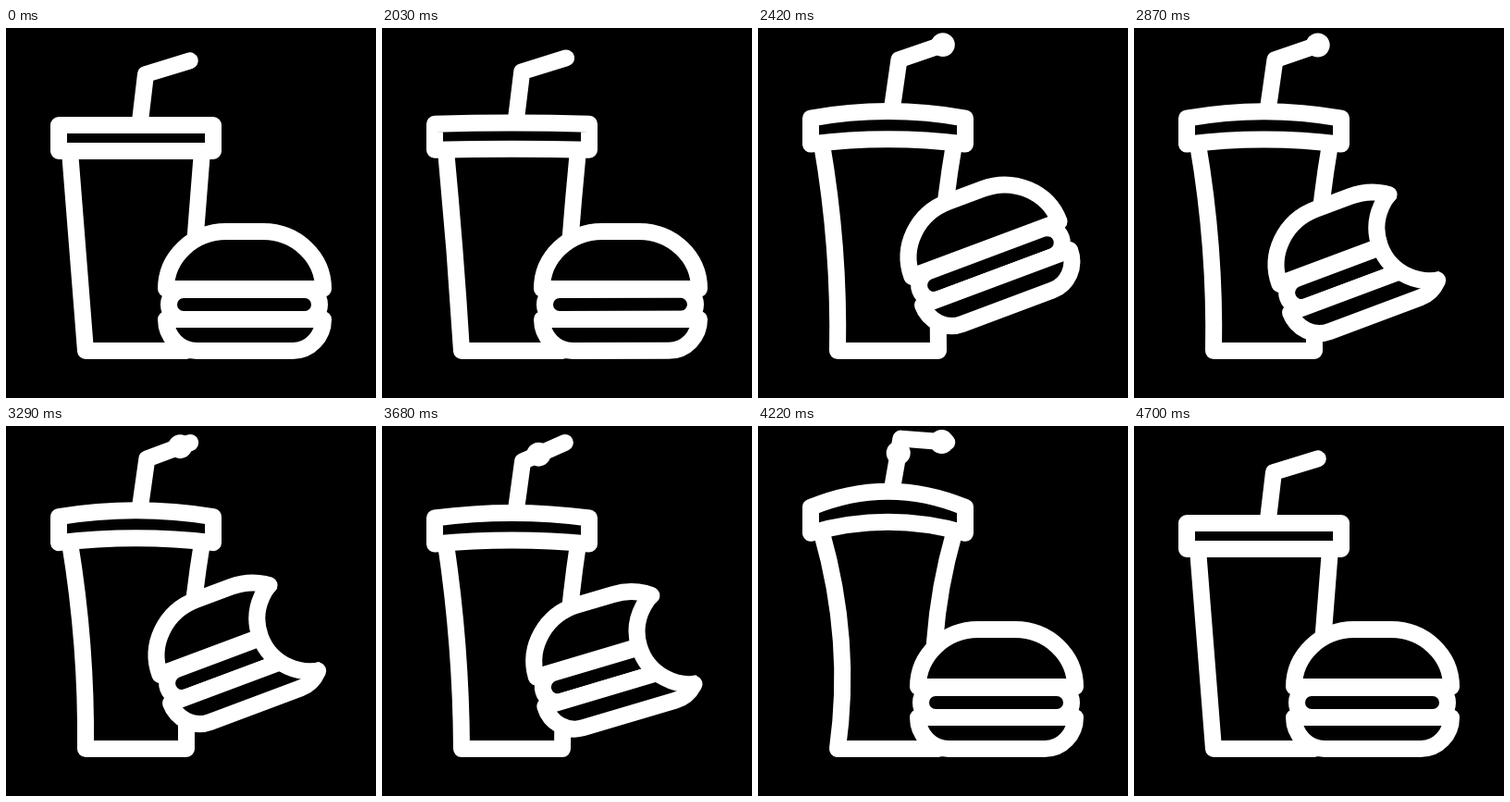
Animation of 400 by 400 pixels, one loop 4730 ms. Source, as an HTML page:

```html
<!DOCTYPE html>
<html lang="en">
<head>
<meta charset="utf-8">
<title>Drink and burger</title>
<style>
  html, body { margin: 0; height: 100%; overflow: hidden; background: #000; }
  svg { display: block; width: 100vw; height: 100vh; }
</style>
</head>
<body>
<svg viewBox="0 0 400 400" fill="#000" stroke="#fff" stroke-width="18" stroke-linecap="round" stroke-linejoin="round">
  <clipPath id="inside">
    <path id="outline" d="M173 282A65 62 0 0 1 238 220H278A65 62 0 0 1 343 282L339 299L343 315A33 34 0 0 1 310 349H206A33 34 0 0 1 173 315L177 299Z"/>
  </clipPath>
  <path id="straw" fill="none"/>
  <g id="bulbs" fill="#fff" stroke="none"></g>
  <path id="cup"/>
  <path id="lid"/>
  <g id="burger">
    <rect x="176" y="283" width="163" height="32" rx="16"/>
    <path d="M173 282A65 62 0 0 1 238 220H278A65 62 0 0 1 343 282Z"/>
    <path d="M173 315H343A33 34 0 0 1 310 349H206A33 34 0 0 1 173 315Z"/>
    <circle id="hole" cy="282" r="62" stroke="none"/>
    <g clip-path="url(#inside)"><circle id="edge" cy="282" r="57" fill="none"/></g>
    <path id="caps"/>
  </g>
</svg>
<script>
const LOOP = 4730, GULP = 455, FIRST_GULP = 2420, BITE_R = 57;
const $ = id => document.getElementById(id);
const set = (id, name, value) => $(id).setAttribute(name, value);

const progress = (t, from, to) => Math.max(0, Math.min(1, (t - from) / (to - from)));
const smooth = (t, from, to) => {
  const u = progress(t, from, to);
  return u * u * (3 - 2 * u);
};

// The last gulp follows the one before it at a shorter distance
const bulbs = Array.from({ length: 6 }, (_, i) => ({
  arrival: FIRST_GULP + GULP * Math.min(i, 4.44),
  dot: $("bulbs").appendChild(document.createElementNS("http://www.w3.org/2000/svg", "circle")),
}));

const outline = $("outline"), outlineLength = outline.getTotalLength();
const rim = Array.from({ length: 401 }, (_, i) => outline.getPointAtLength(outlineLength * i / 400));

function drawDrink(t) {
  const pull = (1 - (1 - progress(t, 2000, 2350)) ** 2) * (1 - smooth(t, 4210, 4650));
  const wobble = Math.cos(2 * Math.PI * ((t - FIRST_GULP) / GULP - 0.1));
  const lastGulp = smooth(t, 3860, 4200);
  const r = pull * (12.5 + 3 * wobble + 20 * lastGulp), e = r / 2;
  const angle = (-17 + pull * (4 * wobble - 5 + 24 * lastGulp)) * Math.PI / 180;

  const bendX = 151 + r * 0.1, bendY = 50 - r * 1.06;
  const tipX = bendX + 50 * Math.cos(angle), tipY = bendY + 50 * Math.sin(angle);
  set("straw", "d", `M144.5 ${105 - r}L${bendX} ${bendY}L${tipX} ${tipY}`);
  set("cup", "d", `M69 ${133 - e}Q${77.5 + r * 0.72} ${241 - e / 2} 86 349H195` +
    `Q${203.5 - r * 0.72} ${241 - e / 2} 212 ${133 - e}`);
  set("lid", "d", `M57 ${105 - e}Q140.5 ${105 - 1.5 * r} 224 ${105 - e}V${133 - e}` +
    `Q140.5 ${133 - 1.2 * r} 57 ${133 - e}Z`);

  const straw = $("straw"), length = straw.getTotalLength();
  for (const { arrival, dot } of bulbs) {
    const s = length + (t - arrival) * 0.3;
    const size = Math.min(13, 8 + s / 4, 13 - (s - length) * 0.15);
    const p = straw.getPointAtLength(Math.max(0, Math.min(s, length)));
    dot.setAttribute("cx", p.x);
    dot.setAttribute("cy", p.y);
    dot.setAttribute("r", size < 8 ? 0 : size);
  }
}

function drawBurger(t) {
  const lift = smooth(t, 2020, 2420) * (1 - smooth(t, 3480, 4200));
  const recoil = smooth(t, 2600, 2870) * (1 - smooth(t, 2870, 3200));
  const bite = smooth(t, 2580, 2700) * (1 - smooth(t, 3720, 3880));
  set("burger", "transform", `translate(${-12 * lift - 9 * recoil} ${-43 * lift + 8 * recoil}) rotate(${-20.5 * lift} 258 282)`);

  const x = 346 + 70 * (1 - bite);
  set("hole", "cx", x);
  set("edge", "cx", x);
  // Round off the tips where the bite crosses the outline
  const bitten = p => Math.hypot(p.x - x, p.y - 282) < BITE_R;
  set("caps", "d", rim.filter((p, i) => i && bitten(p) !== bitten(rim[i - 1]))
    .map(p => `M${p.x} ${p.y}h.01`).join(""));
}

function frame() {
  const t = performance.now() % LOOP;
  drawDrink(t);
  drawBurger(t);
  requestAnimationFrame(frame);
}
frame();
</script>
</body>
</html>
```
